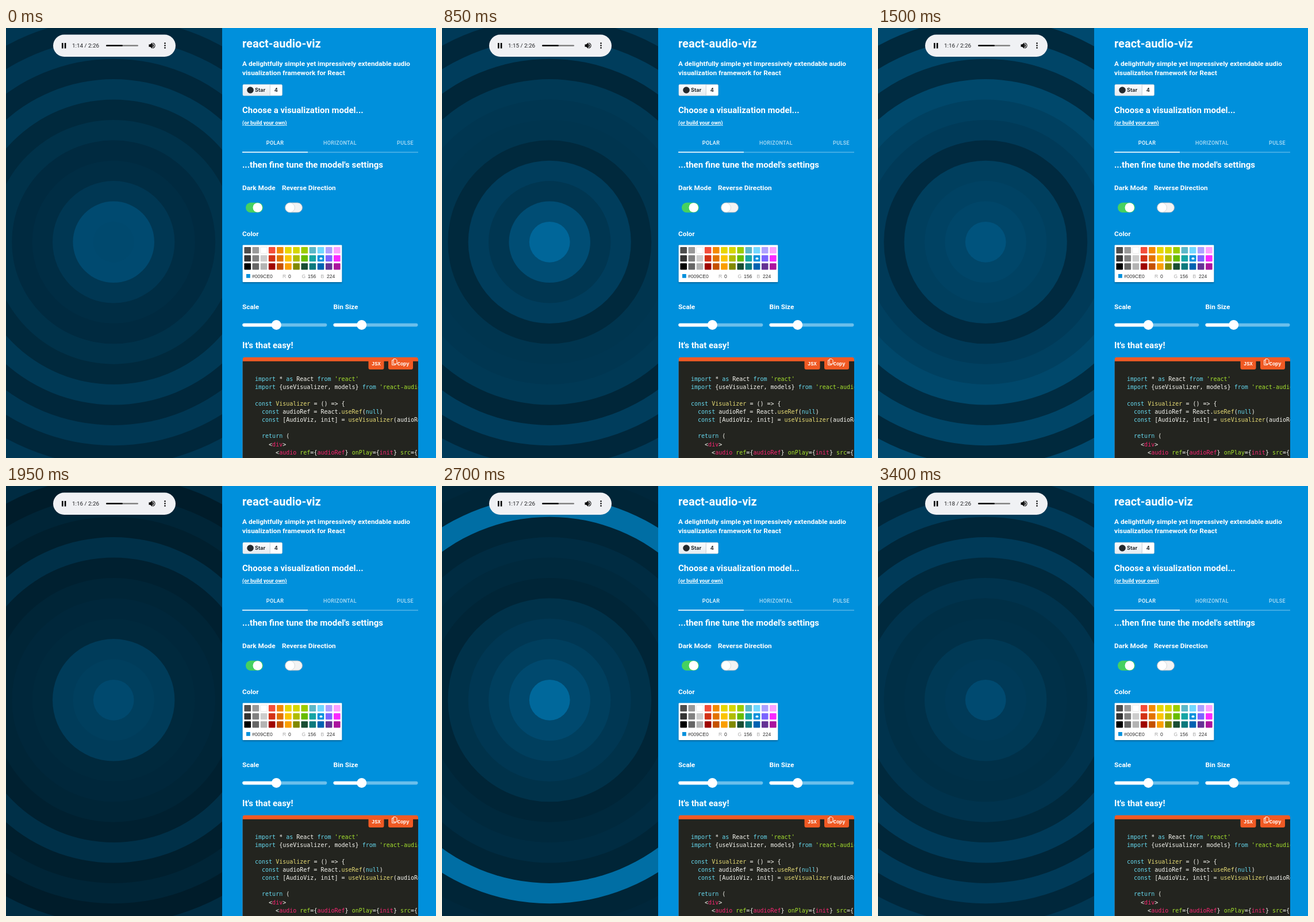
Animation of 748 by 748 pixels, one loop 3.45 s. Source, as an HTML page:

```html
<!DOCTYPE html>
<html lang="en">
<head>
<meta charset="utf-8">
<title>react-audio-viz</title>
<style>
  html, body { margin: 0; width: 100%; height: 100%; overflow: hidden; background: #0090dc; }
  svg { display: block; font-family: Roboto, sans-serif; }
  .panel { font-weight: 700; font-size: 11.8px; fill: #fff; }
  .big { font-size: 15px; }
  .tab { font-weight: 500; font-size: 9px; letter-spacing: .35px; text-anchor: middle; }
  .star { font: 700 9px Inter, sans-serif; fill: #24292e; }
  .rgb { font: 8.6px "Liberation Sans", Arial, sans-serif; fill: #333; }
  .rgb .dim { fill: #aaa; }
  .tag { font: 700 8.7px "Liberation Mono", monospace; fill: #fff; }
  .code { font: 10px "DejaVu Sans Mono", monospace; fill: #f8f8f2; }
  .code text { white-space: pre; }
  .k { fill: #66d9ef; } .s { fill: #a6e22e; } .f { fill: #e6db74; } .t { fill: #f92672; }
</style>
</head>
<body>
<svg width="748" height="748" viewBox="0 0 748 748">
  <defs>
    <clipPath id="stage"><path d="M0 0H376V748H0z"/></clipPath>
    <clipPath id="block"><path d="M411.5 572H717V748H411.5z"/></clipPath>
    <linearGradient id="button" x2="0" y2="1"><stop stop-color="#fafbfc"/><stop offset="1" stop-color="#e6ebf0"/></linearGradient>
    <filter id="shadow" x="-10%" y="-10%" width="120%" height="130%"><feDropShadow dx="0" dy="1.5" stdDeviation="1.5" flood-opacity=".35"/></filter>
  </defs>

  <g id="rings" clip-path="url(#stage)"></g>

  <g id="player">
    <rect x="82" y="11.5" width="213" height="38.5" rx="19.25" fill="#f0f1f4"/>
    <path d="M97 26h2.6v9.5H97zM101.8 26h2.6v9.5h-2.6z"/>
    <text id="clock" x="115" y="34.2" font-size="9.9" fill="#202124"></text>
    <rect x="174" y="29.4" width="56" height="2.4" rx="1.2" fill="#777"/>
    <rect x="174" y="29.4" width="29" height="2.4" rx="1.2"/>
    <path d="M248.5 28.5h2.5l3.3-3.2v10.6l-3.3-3.2h-2.5z"/>
    <path d="M255.4 28.2q2 2.4 0 4.8zM255.5 26q3.5 1.1 3.5 4.6t-3.5 4.6" fill="none" stroke="#000" stroke-width="1.1"/>
    <circle cx="276.5" cy="26.6" r="1.25"/><circle cx="276.5" cy="30.6" r="1.25"/><circle cx="276.5" cy="34.6" r="1.25"/>
  </g>

  <path d="M376 0H748V748H376z" fill="#0090dc"/>
  <g class="panel">
    <text x="411" y="34" font-size="20">react-audio-viz</text>
    <text x="411" y="66">A delightfully simple yet impressively extendable audio</text>
    <text x="411" y="82">visualization framework for React</text>
    <text x="411" y="147.5" class="big">Choose a visualization model...</text>
    <text x="411" y="168" font-size="9.2" text-decoration="underline">(or build your own)</text>
    <text x="468" y="203" class="tab">POLAR</text>
    <text x="581" y="203" class="tab" opacity=".7">HORIZONTAL</text>
    <text x="694.5" y="203" class="tab" opacity=".7">PULSE</text>
    <path d="M411 215.6H717v1.1H411z" opacity=".4"/>
    <path d="M411 215.3H525v1.5H411z"/>
    <text x="411" y="243" class="big">...then fine tune the model's settings</text>
    <text x="411" y="281.7">Dark Mode</text>
    <text x="480" y="281.7">Reverse Direction</text>
    <text x="411" y="362">Color</text>
    <text x="411" y="488.5">Scale</text>
    <text x="569.5" y="488.5">Bin Size</text>
    <text x="411" y="557.3" class="big">It's that easy!</text>
  </g>

  <g class="star">
    <rect x="412" y="98.3" width="68.5" height="19.4" rx="2" fill="#fff" stroke="#c5cdd5" stroke-width=".8"/>
    <path d="M412.4 98.7H459V117.3H412.4z" fill="url(#button)"/>
    <path d="M459.3 98.5v19" stroke="#b9c3cc" stroke-width=".8"/>
    <circle cx="425" cy="108" r="5.8"/>
    <text x="433" y="111.4">Star</text>
    <text x="466.7" y="111.4">4</text>
  </g>

  <rect x="417" y="303.8" width="30" height="17.2" rx="8.6" fill="#46d160"/>
  <circle cx="437.7" cy="312.4" r="8.2" fill="#fff"/>
  <rect x="485.5" y="304" width="30" height="16.8" rx="8.4" fill="#f3f3f3" stroke="#aeb6bb" stroke-width=".9"/>
  <circle cx="494.2" cy="312.4" r="8.2" fill="#fff" stroke="#c8cdd0" stroke-width=".7"/>

  <g id="picker" class="rgb">
    <rect x="411.7" y="377.5" width="172.6" height="64.5" rx="1" fill="#fff" filter="url(#shadow)"/>
    <g id="swatches"></g>
    <rect x="545.5" y="399.2" width="5" height="3.6" rx="1.5" fill="#fff"/>
    <path d="M418 428h6.8v6.8H418z" fill="#0090dc"/>
    <text x="428" y="434.7">#009CE0</text>
    <text x="481" y="434.7" class="dim">R</text><text x="491" y="434.7">0</text>
    <text x="514.5" y="434.7" class="dim">G</text><text x="525" y="434.7">156</text>
    <text x="547.5" y="434.7" class="dim">B</text><text x="558" y="434.7">224</text>
  </g>

  <g id="sliders" fill="#fff"></g>

  <g clip-path="url(#block)">
    <rect x="411.5" y="572.7" width="305.5" height="190" rx="4" fill="#f05a24"/>
    <path d="M411.5 579.7H717V748H411.5z" fill="#23241f"/>
    <rect x="630.5" y="573" width="27" height="21" rx="3" fill="#f05a24"/>
    <rect x="665" y="573" width="43" height="21" rx="3" fill="#f05a24"/>
    <g class="tag"><text x="636" y="587">JSX</text><text x="680.7" y="587">Copy</text></g>
    <path d="M674 575.7h4l2 2v6.6h-6zM673.8 577.8h-2.2v8.4h5.8v-1.8" fill="none" stroke="#fff" stroke-width="1"/>
    <g id="code" class="code"></g>
  </g>
</svg>
<script>
const LOOP = 3450, STEP = 50, RING = 35.4;
const BASE = [0, 146, 219];
const $ = id => document.getElementById(id);

// Brightness (percent) per ring from the centre outwards, at each time in ms.
const levels = [
  [0,    [50, 51, 38, 31, 29, 34, 28, 39, 27, 38, 27, 38]],
  [850,  [70, 53, 37, 42, 28, 36, 37, 39, 26, 42, 27, 40]],
  [1500, [57, 48, 45, 43, 29, 40, 44, 49, 30, 47, 28, 50]],
  [1950, [50, 43, 41, 28, 27, 25, 22, 33, 21, 25, 19, 30]],
  [2400, [51, 47, 44, 30, 27, 34, 36, 38, 34, 33, 17, 37]],
  [2700, [71, 50, 43, 38, 34, 25, 28, 30, 25, 75, 25, 27]],
  [3400, [51, 40, 39, 33, 32, 35, 28, 40, 26, 40, 27, 38]]
];

const palette = `4d4d4d 999999 ffffff f44e3b f58a00 e8d600 d6d600 9ccc00 5cb8c8 73d8ff aea1ff fda1ff
  333333 808080 cccccc d33115 e27300 fcc400 b0bc00 68bc00 16a5a5 0090dc 7b64ff fa28ff
  000000 666666 b3b3b3 9f0500 c45100 fb9e00 808900 194d33 0c797d 0062b1 653294 ab149e`.split(/\s+/);
$('swatches').innerHTML = palette.map((hex, i) => {
  const x = 414.4 + i % 12 * 14.15, y = 381 + Math.floor(i / 12) * 14.15;
  const edge = hex === 'ffffff' ? ' stroke="#ddd" stroke-width=".7"' : '';
  return `<rect x="${x}" y="${y}" width="11.6" height="11.2" rx="1" fill="#${hex}"${edge}/>`;
}).join('');

const slider = (x, thumb) => `
  <rect x="${x}" y="513.8" width="147" height="5.6" rx="2.8" opacity=".42"/>
  <rect x="${x}" y="513.8" width="${thumb - x}" height="5.6" rx="2.8"/>
  <circle cx="${thumb}" cy="516.6" r="8.5"/>`;
$('sliders').innerHTML = slider(411.3, 470.3) + slider(569.5, 618.7);

// In the listing, [k:word] marks a coloured token.
const listing = `[k:import] * [k:as] React [k:from] [s:'react']
[k:import] {useVisualizer, models} [k:from] [s:'react-audio-viz']

[k:const] [f:Visualizer] = () => {
  [k:const] audioRef = React.[f:useRef]([k:null])
  [k:const] [AudioViz, init] = [f:useVisualizer](audioRef)

  [k:return] (
    <[t:div]>
      <[t:audio] [s:ref]={[t:audioRef]} [s:onPlay]={[t:init]} [s:src]={[t:song]}`;
const escapeHtml = s => s.replace(/&/g, '&amp;').replace(/</g, '&lt;').replace(/>/g, '&gt;');
$('code').innerHTML = listing.split('\n').map((line, i) =>
  `<text x="433" y="${614 + i * 14.2}">` +
  escapeHtml(line).replace(/\[([ksft]):([^\]]*)\]/g, '<tspan class="$1">$2</tspan>') +
  '</text>').join('');

const count = levels[0][1].length;
$('rings').innerHTML = Array.from({ length: count }, (_, i) =>
  `<circle cx="187.2" cy="372.3" r="${(count - i) * RING}"/>`).join('');
const rings = [...$('rings').children].reverse();

function draw(t) {
  const next = Math.max(1, levels.findIndex(([at]) => at >= t));
  const [t0, from] = levels[next - 1], [t1, to] = levels[next];
  const mix = (t - t0) / (t1 - t0);
  rings.forEach((ring, i) => {
    const level = (from[i] + (to[i] - from[i]) * mix) / 100;
    ring.setAttribute('fill', `rgb(${BASE.map(c => Math.round(c * level))})`);
  });
  $('clock').textContent = `1:${Math.floor(14.8 + t / 1000)} / 2:26`;
}

function tick() {
  draw(Math.floor(performance.now() % LOOP / STEP) * STEP);
  requestAnimationFrame(tick);
}
tick();
</script>
</body>
</html>
```
